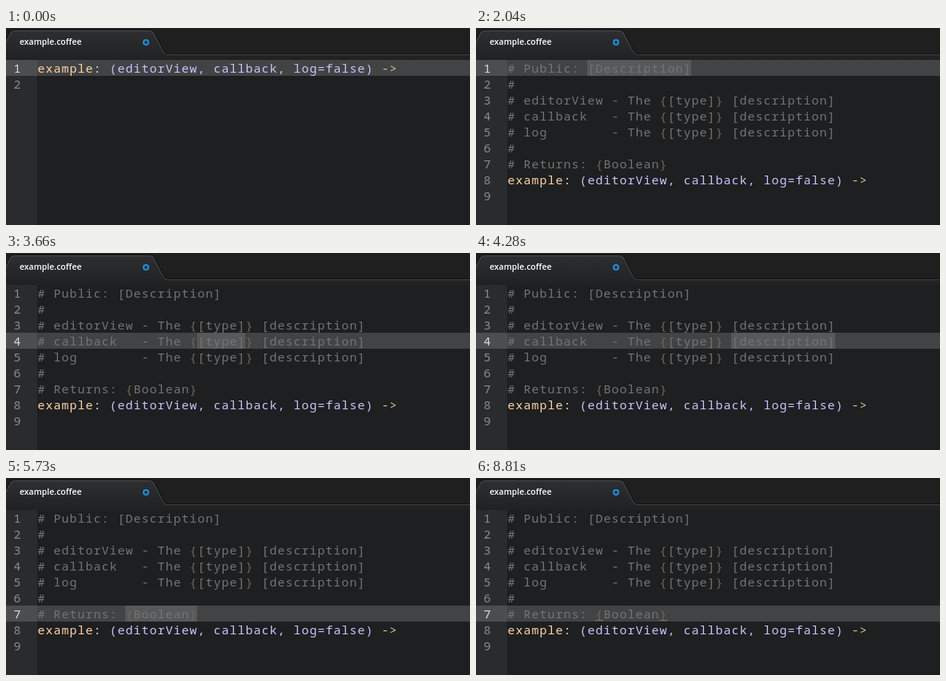
An HTML page for the animation above (8.96 s loop, 580x247 px).

```html
<!DOCTYPE html>
<html lang="en">
<head>
<meta charset="utf-8">
<title>Doc comment snippet</title>
<style>
html, body { margin: 0; width: 100%; height: 100%; overflow: hidden; background: #1d1f20; }
svg { display: block; }
text { white-space: pre; }
#code { font: 15px "Noto Sans Mono", monospace; letter-spacing: 1px; }
.title { font: 600 10.5px "Open Sans", sans-serif; fill: #fff; }
.num { fill: #8b8c8e; }
.num.on { fill: #dcdcdc; }
.doc { fill: #747474; }
.brace { fill: #75665a; }
.name, .op, .arg, .arrow { font-weight: 500; }
.name { fill: #ffd2a7; }
.op { fill: #ededed; }
.arg { fill: #c6c5fe; }
.arrow { fill: #cfcb90; }
</style>
</head>
<body>
<svg width="580" height="247" viewBox="0 0 580 247">
  <defs>
    <linearGradient id="tab" x1="0" y1="0" x2="0" y2="1">
      <stop offset="0" stop-color="#2e2f31"/>
      <stop offset="1" stop-color="#1f2022"/>
    </linearGradient>
  </defs>
  <rect width="580" height="247" fill="#1d1f20"/>
  <rect width="580" height="40" fill="#1f1f1f"/>
  <path fill="url(#tab)" stroke="#101010"
    d="M-12 42L-9 33 5 5Q6.500 2.500 10 2.500H180Q183.500 2.500 185 5L198 30Q199.500 32.500 203 32.500H582V42Z"/>
  <path fill="none" stroke="#fff" stroke-opacity=".15"
    d="M-8 33L6 6Q7.500 3.500 11 3.500H179Q182.500 3.500 184 6L197 31Q198.500 33.500 202 33.500H580"/>
  <rect y="40" width="580" height="207" fill="#1d1f20"/>
  <rect y="40" width="39" height="207" fill="#2a2b2f"/>
  <text class="title" x="17" y="21">example.coffee</text>
  <circle cx="175" cy="18" r="3" fill="none" stroke="#1a91dc" stroke-width="2"/>
  <g id="code"></g>
</svg>
<script>
const LOOP = 8960, LEFT = 39, TOP = 40, CELL = 10, ROW = 20;
const code = document.getElementById('code');

const span = (cls, s) => `<tspan class="${cls}">${s}</tspan>`;
const doc = s => span('doc', s.replace(/[{}]/g, b => span('brace', b)));
const param = name => doc(`# ${name.padEnd(10)} - The {[type]} [description]`);

const signature = span('name', 'example') + span('op', ':') +
  span('arg', ' (editorView, callback, log=false) ') + span('arrow', '-&gt;');
const before = [signature, ''];
const after = [
  doc('# Public: [Description]'), doc('#'),
  ...['editorView', 'callback', 'log'].map(param),
  doc('#'), doc('# Returns: {Boolean}'), signature, ''
];

// Tab stops: start time, row, first column, length
const stops = [
  [0, 0, 0, 0], [580, 0, 2, 6], [2040, 0, 10, 13],
  [2660, 2, 20, 6], [3100, 2, 28, 13],
  [3660, 3, 20, 6], [4280, 3, 28, 13],
  [4710, 4, 20, 6], [5300, 4, 28, 13],
  [5730, 6, 11, 9], [6320, 6, 20, 0]
];
// Spans of time when the caret is lit
const lit = [[150, 430], [6320, 6470], [6940, 7210], [7620, 8010], [8410, 8810]];

const rect = (x, y, w, h, fill) =>
  `<rect x="${x}" y="${y}" width="${w}" height="${h}" fill="${fill}"/>`;

function view(t) {
  const [, row, col, len] = stops.findLast(s => t >= s[0]);
  const y = TOP + row * ROW, x = LEFT + col * CELL;
  let out = rect(0, y, 580, ROW, 'rgba(255,255,255,.16)');
  if (len) out += rect(x, y, len * CELL, ROW, 'rgba(255,255,255,.11)');

  (t < 580 ? before : after).forEach((line, i) => {
    const base = TOP + i * ROW + 16;
    out += `<text class="num${i === row ? ' on' : ''}" x="9.500" y="${base}">${i + 1}</text>` +
      `<text x="${LEFT + .5}" y="${base}">${line}</text>`;
  });

  if (t >= 6320) {
    for (const c of [11, 19]) out += rect(LEFT + c * CELL, y + 18, CELL, 1, '#8a7556');
  }
  if (lit.some(([a, b]) => t >= a && t < b)) out += rect(x, y, 1, ROW, '#fff');
  return out;
}

let shown = '';
function draw() {
  const next = view(performance.now() % LOOP);
  if (next !== shown) code.innerHTML = shown = next;
  requestAnimationFrame(draw);
}
draw();
</script>
</body>
</html>
```
